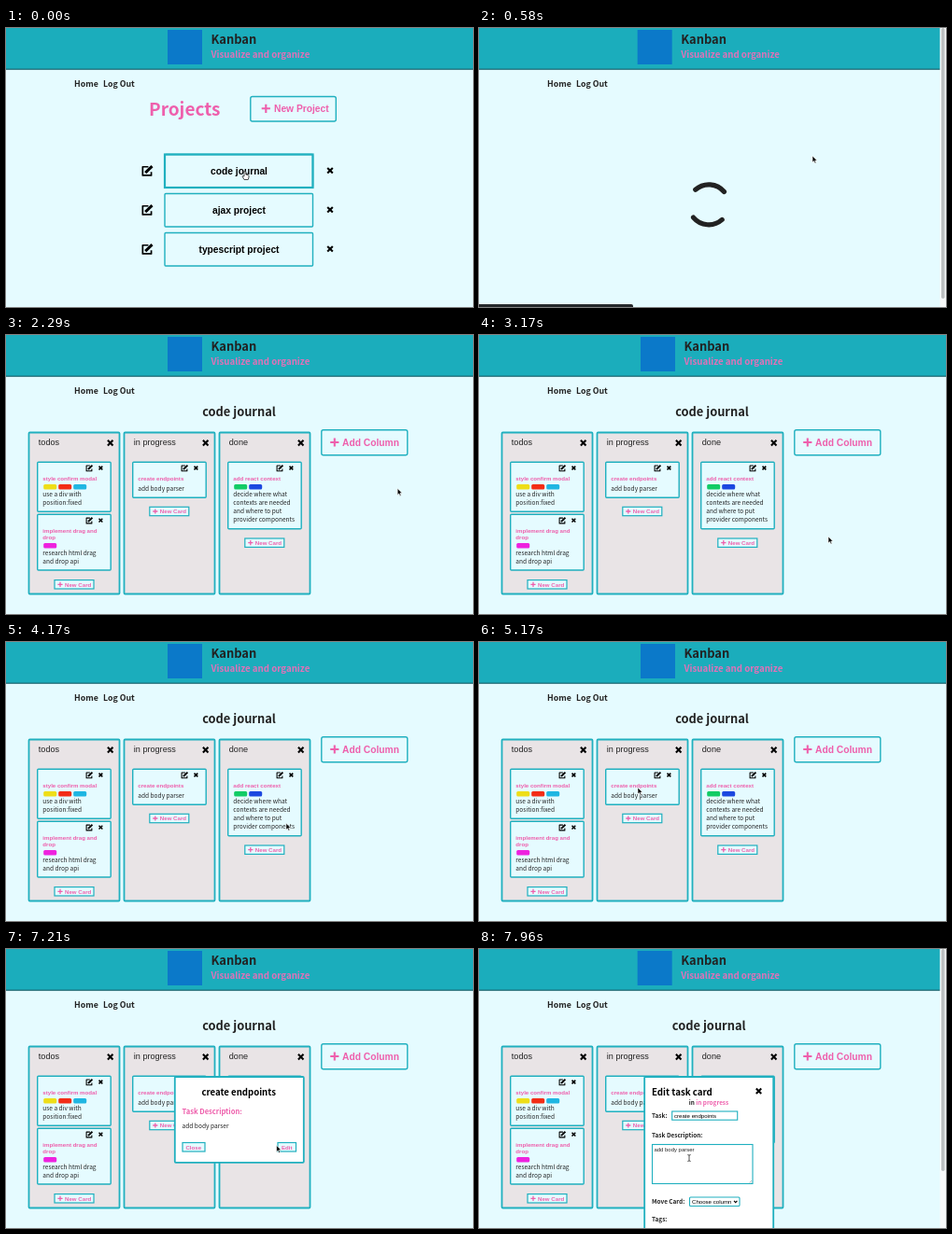
Animation of 500 by 299 pixels, one loop 8 s. Source, as an HTML page:

```html
<!DOCTYPE html>
<html lang="en">
<head>
<meta charset="utf-8">
<title>Kanban board demo</title>
<style>
  html, body { margin: 0; width: 100%; height: 100%; overflow: hidden; background: #e5fbff; }
  svg { display: block; width: 500px; height: 299px; }
  text { font-family: "Noto Sans CJK JP", "Noto Sans CJK SC", "Noto Sans CJK", "Noto Sans", sans-serif; fill: #222; white-space: pre; }
  .arial { font-family: "Liberation Sans", Arial, sans-serif; }
  .bold { font-weight: 700; }
  .mid { text-anchor: middle; }
  .pink { fill: #ee5fac; }
  .black { fill: #000; }
</style>
</head>
<body>
<svg id="stage" viewBox="0 0 500 299"></svg>
<script>
const LOOP = 8000;
const TEAL = '#20b0bf', PAGE = '#e5fbff', PINK = '#ee5fac';
const SPIN_START = 290, BOARD_START = 750, VIEW_START = 5500, EDIT_START = 7600;

const text = (x, y, size, str, cls = '') =>
  `<text x="${x}" y="${y}" font-size="${size}" class="${cls}">${str}</text>`;
const rect = (x, y, w, h, fill, extra = '') =>
  `<rect x="${x}" y="${y}" width="${w}" height="${h}" fill="${fill}" ${extra}/>`;
const box = (x, y, w, h, fill = PAGE, line = 1.4, r = 1) =>
  rect(x, y, w, h, fill, `rx="${r}" stroke="${TEAL}" stroke-width="${line}"`);
const path = (d, line, color = '#000', extra = '') =>
  `<path d="${d}" fill="none" stroke="${color}" stroke-width="${line}" ${extra}/>`;
const cross = (x, y, r, line) =>
  path(`M${x - r} ${y - r}l${2 * r} ${2 * r}M${x + r} ${y - r}l${-2 * r} ${2 * r}`, line);
const plus = (x, y, r, line) =>
  path(`M${x - r} ${y}h${2 * r}M${x} ${y - r}v${2 * r}`, line, PINK);
const pen = (x, y, scale) => `<g transform="translate(${x} ${y}) scale(${scale})">
  ${path('M1-3.7H-4.3V4.3H3.7V1', 1.5, '#000', 'stroke-linejoin="round"')}
  ${path('M-1.8 1.8L4.5-4.2', 2.6)}</g>`;
const group = (id, content) => `<g id="${id}">${content}</g>`;

const header = rect(173, 2, 37, 37, '#0b79c9') +
  text(219.5, 17, 12.9, 'Kanban', 'bold') +
  `<text x="219.5" y="32.3" font-size="9.7" class="bold" style="fill:#df72b8">Visualize and organize</text>`;

function project(name, i) {
  const y = 135.5 + 42 * i;
  return box(170, y, 158.5, 35.5) + text(249.5, y + 21.2, 10.25, name, 'arial bold mid black') +
    pen(151.3, y + 17.5, 1.15) + cross(347, y + 17.3, 2.8, 2.1);
}

const projects = text(153, 94.3, 19, 'Projects', 'bold pink') +
  box(261.8, 73.5, 91.5, 26.5, PAGE, 1.4, 2) + plus(278.3, 86.3, 4.6, 2.1) +
  text(287, 90.2, 10.25, 'New Project', 'arial bold pink') +
  ['code journal', 'ajax project', 'typescript project'].map(project).join('') +
  group('hover', rect(170, 135.5, 158.5, 35.5, 'none', `stroke="${TEAL}" stroke-width="2.2"`));

function card(x, y, height, titles, tags, body) {
  const tagTop = y + 16.8 + 7 * titles.length;
  const bodyTop = y + (tags.length ? 29.5 : 24) + 7 * titles.length;
  return box(x, y, 78.5, height) + pen(x + 55.5, y + 6.5, .72) + cross(x + 67.7, y + 6.3, 1.9, 1.5) +
    titles.map((s, i) => text(x + 5.6, y + 20 + 7 * i, 6.13, s, 'arial bold pink')).join('') +
    tags.map((c, i) => rect(x + 6.5 + 16 * i, tagTop, 14, 5.4, c, 'rx="1.5"')).join('') +
    body.map((s, i) => text(x + 5.6, bodyTop + 9 * i, 6.55, s)).join('');
}

const newCard = (x, y) => box(x, y, 42, 9.4, PAGE, 1.2, 0) + plus(x + 6, y + 4.7, 2.6, 1.3) +
  text(x + 11, y + 7, 6.13, 'New Card', 'arial bold pink');

const column = (x, name, content) => box(x, 104.5, 97, 173, '#e9e4e6', 1.8) +
  text(x + 10.3, 118.4, 9.1, name, 'arial') + cross(x + 87.2, 115.6, 2.8, 2.1) + content;

const board = group('boardTitle', text(249.5, 87, 12.85, 'code journal', 'bold mid')) +
  column(24.5, 'todos',
    card(33.7, 136.2, 53, ['style confirm modal'], ['#eede18', '#f32d16', '#1fb6e2'], ['use a div with', 'position:fixed']) +
    card(33.7, 192.3, 59.7, ['implement drag and', 'drop'], ['#ee22df'], ['research html drag', 'and drop api']) +
    newCard(52, 262.6)) +
  column(126.5, 'in progress',
    card(135.7, 136.2, 38, ['create endpoints'], [], ['add body parser']) + newCard(153.8, 184.3)) +
  column(228.5, 'done',
    card(237.7, 136.2, 71.5, ['add react context'], ['#12cc66', '#1c48e0'],
      ['decide where what', 'contexts are needed', 'and where to put', 'provider components']) +
    newCard(255.8, 218)) +
  box(337.8, 101.7, 92, 27, PAGE, 1.4, 2) + plus(351.8, 115, 4.6, 2.1) +
  text(360, 118.7, 10.25, 'Add Column', 'arial bold pink');

const viewModal = box(180.8, 137, 138, 91.8, '#fff', 1.8) +
  text(249.2, 156.8, 9.6, 'create endpoints', 'bold mid black') +
  text(188.5, 177.3, 7.6, 'Task Description:', 'bold pink') +
  text(188.5, 192, 6.6, 'add body parser') +
  box(189, 207.5, 24, 9.5, PAGE, 1.2, 0) + text(192.4, 214.6, 6.13, 'Close', 'arial bold pink') +
  box(291, 207.5, 19.5, 9.5, PAGE, 1.2, 0) + text(295, 214.6, 6.13, 'Edit', 'arial bold pink');

const editModal = box(177.2, 137, 138, 180, '#fff', 1.8) +
  text(185, 156.6, 9.7, 'Edit task card', 'bold black') + cross(299.5, 152.3, 2.7, 2.1) +
  text(224.8, 167, 6.4, 'in', 'bold') + text(232.3, 167, 6.4, 'in progress', 'bold pink') +
  text(185, 180.6, 6.45, 'Task:', 'bold') +
  box(206.7, 174, 70, 9.2, '#fff', 1.1, 0) + text(209, 180.8, 6.1, 'create endpoints', 'arial black') +
  text(185, 202.2, 6.45, 'Task Description:', 'bold') +
  box(185.5, 209.5, 107.5, 42, '#fff', 1.1, 0) + text(187.5, 217, 5.95, 'add body parser', 'arial') +
  path('M289.5 250.5l2.5-2.5M291 250.7l1-1', .5, '#888') +
  text(185, 272.6, 6.45, 'Move Card:', 'bold') +
  box(225.5, 266, 53.5, 9.5, '#fff', 1.1, 1) + text(228, 272.8, 6.1, 'Choose column', 'arial black') +
  path('M273 269.8l1.7 1.8 1.7-1.8', 1.1) +
  text(185, 292.2, 6.45, 'Tags:', 'bold');

const arc = 'M-15.4-15A21.5 21.5 0 0 1 15.4-15M15.4 15A21.5 21.5 0 0 1-15.4 15';
const cursorLine = 'stroke="#fff" stroke-width=".6"';

document.getElementById('stage').innerHTML =
  rect(0, 0, 500, 299, PAGE) + rect(0, 0, 500, 44, '#1badbc') + rect(0, 43.6, 500, 1.2, '#17626c') +
  group('header', header) +
  text(73, 62.6, 8.8, 'Home', 'bold') + text(104, 62.6, 8.8, 'Log Out', 'bold') +
  group('projects', projects) +
  group('board', board) +
  group('viewModal', viewModal) +
  group('editModal', editModal) +
  group('spinner', path(arc, 5.2, '#222', 'stroke-linecap="round"')) +
  group('statusBar', rect(-4, 296, 169, 8, '#25282b', 'rx="2"')) +
  group('scrollbar', rect(493.5, 0, 6.5, 299, '#f7f9f9') +
    `<rect id="thumb" x="495" y="0" width="3.6" height="290" rx="1.8" fill="#bcc0c1"/>`) +
  group('cursor',
    group('arrow', `<path d="M0 0V7L1.6 5.6 2.7 8.1 3.9 7.6 2.8 5.1H5Z" ${cursorLine}/>`) +
    group('hand', `<path d="M-1-2Q0-3.2.9-2V1L3.6 1.8Q4.2 2.2 4 4L3.2 6.5H-1L-3 3Q-2.8 2-1 3Z" fill="#fff" stroke="#222" stroke-width=".8"/>`) +
    group('beam', path('M-1.6-3.5Q0-3.5 0-2.5V2.5Q0 3.5-1.6 3.5M1.6-3.5Q0-3.5 0-2.5M0 2.5Q0 3.5 1.6 3.5', .8, '#222')));

// Pointer stops: time, x, y
const route = [
  [0, 256, 156], [180, 256, 156], [580, 357, 137], [1000, 444, 136], [1700, 444, 136],
  [3170, 374, 216], [3600, 374, 216], [5000, 170, 156], [5600, 170, 156], [6250, 212, 206],
  [6700, 212, 206], [7350, 300, 211], [7640, 300, 211], [7940, 225, 224], [LOOP, 225, 224]
];

function pointerAt(t) {
  const i = route.findIndex(stop => stop[0] > t);
  const [t0, x0, y0] = route[i - 1], [t1, x1, y1] = route[i];
  const p = (t - t0) / (t1 - t0), e = p * p * (3 - 2 * p);
  return [x0 + (x1 - x0) * e, y0 + (y1 - y0) * e];
}

const el = id => document.getElementById(id);
const show = (id, on) => { el(id).style.display = on ? '' : 'none'; };
const move = (id, value) => el(id).setAttribute('transform', value);

function draw(t) {
  const loading = t >= SPIN_START && t < BOARD_START;
  const editing = t >= EDIT_START;
  const scrolling = loading || editing;
  const [x, y] = pointerAt(t);
  const hovering = t < SPIN_START && x < 329;
  const typing = editing && x < 293 && y > 209;

  show('projects', t < SPIN_START);
  show('hover', hovering);
  show('spinner', loading);
  show('statusBar', loading);
  show('board', t >= BOARD_START);
  show('viewModal', t >= VIEW_START && !editing);
  show('editModal', editing);
  show('scrollbar', scrolling);
  el('thumb').setAttribute('height', editing ? 238 : 290);

  const shift = `translate(${scrolling ? -3.3 : 0} 0)`;
  move('header', shift);
  move('boardTitle', shift);
  move('spinner', `translate(246 189.3) rotate(${4 + (t - 580) * 0.3})`);
  move('cursor', `translate(${x} ${y})`);
  show('hand', hovering);
  show('beam', typing);
  show('arrow', !hovering && !typing);
}

function frame() {
  draw(performance.now() % LOOP);
  requestAnimationFrame(frame);
}
frame();
</script>
</body>
</html>
```
